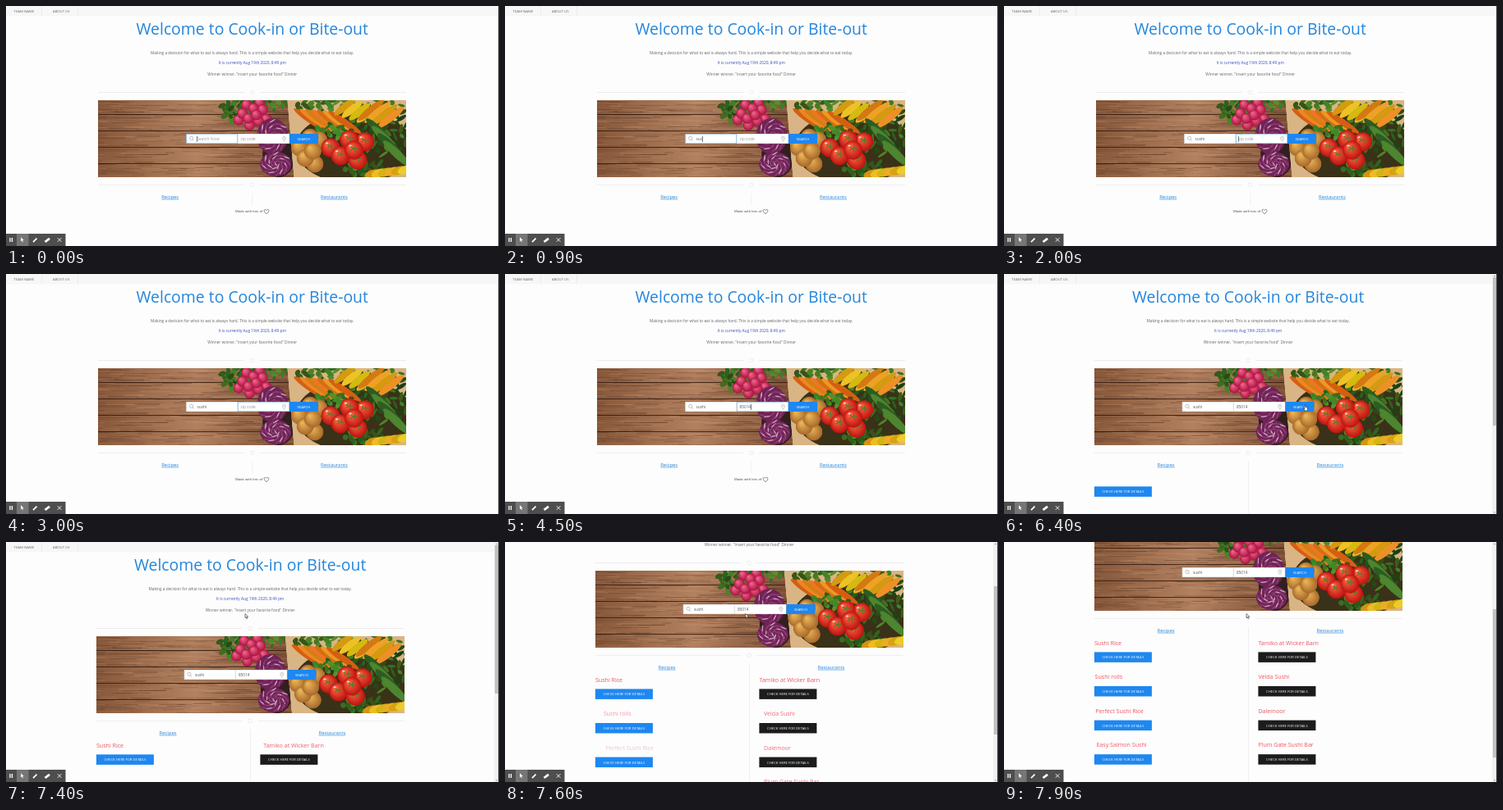
An HTML page with a canvas for the animation above (8000 ms loop, 600x293 px).

```html
<!DOCTYPE html>
<html lang="en">
<head>
<meta charset="utf-8">
<title>Meal finder</title>
<style>
html, body { margin: 0; width: 100%; height: 100%; overflow: hidden; background: #fdfdfd; }
canvas { display: block; }
</style>
</head>
<body>
<canvas id="stage" width="600" height="293"></canvas>
<script>
const ctx = document.getElementById('stage').getContext('2d');
const FONT = '"Open Sans", "Noto Sans", sans-serif';
const BLUE = '#1e87f0', LINK = '#2486dc', GREY = '#666', LINE = '#e8e8e8';
const LOOP = 8000, STEP = 100, TAU = Math.PI * 2;

const clamp = v => Math.max(0, Math.min(1, v));
const span = (t, a, b) => clamp((t - a) / (b - a));
const easeOut = p => 1 - (1 - p) ** 2;
const easeInOut = p => p * p * (3 - 2 * p);
const mix = (a, b, p) => a + (b - a) * p;

function text(str, x, y, size, color, align = 'left') {
  ctx.font = `${size}px ${FONT}`;
  ctx.textAlign = align;
  ctx.fillStyle = color;
  ctx.fillText(str, x, y);
  return ctx.measureText(str).width;
}

function rect(x, y, w, h, color) {
  ctx.fillStyle = color;
  ctx.fillRect(x, y, w, h);
}

function ring(x, y, r, color, width) {
  ctx.beginPath();
  ctx.arc(x, y, r, 0, TAU);
  ctx.strokeStyle = color;
  ctx.lineWidth = width;
  ctx.stroke();
}

function stroke(x1, y1, x2, y2, color, width) {
  ctx.beginPath();
  ctx.moveTo(x1, y1);
  ctx.lineTo(x2, y2);
  ctx.strokeStyle = color;
  ctx.lineWidth = width;
  ctx.stroke();
}

function randomizer(seed) {
  return () => (seed = (seed * 16807) % 2147483647) / 2147483647;
}

// Food banner, 375 x 94, painted once at double size
function paintBanner() {
  const cv = document.createElement('canvas');
  cv.width = 750;
  cv.height = 188;
  const c = cv.getContext('2d');
  const rnd = randomizer(77);
  c.scale(2, 2);

  const blob = (color, x, y, rx, ry = rx, turn = 0) => {
    c.beginPath();
    c.ellipse(x, y, rx, ry, turn, 0, TAU);
    c.fillStyle = color;
    c.fill();
  };
  const ball = (x, y, r, light, dark) => {
    const g = c.createRadialGradient(x - r * .35, y - r * .4, r * .1, x, y, r);
    g.addColorStop(0, light);
    g.addColorStop(1, dark);
    blob(g, x, y, r);
  };
  // Sunflower spread of n items over an ellipse
  const spread = (n, x, y, w, h, draw) => {
    for (let i = n - 1; i >= 0; i--) {
      const r = Math.sqrt((i + .5) / n), a = i * 2.4;
      draw(x + w * r * Math.cos(a), y + h * r * Math.sin(a), i);
    }
  };
  const leaves = (n, x, y, w, h, light) => spread(n, x, y, w, h, (lx, ly) =>
    blob(`hsl(${88 + rnd() * 25} 55% ${light + rnd() * 18}%)`, lx, ly, 3 + rnd() * 4, 1.5 + rnd() * 2, rnd() * 3));
  const fan = (n, x, y, dx, dy, rx, ry, turn, hue) => {
    for (let i = 0; i < n; i++)
      blob(`hsl(${hue + i % 3 * 5} 85% ${45 + i % 2 * 9}%)`, x + i * dx, y + i * dy, rx, ry, turn);
  };
  const cabbage = (x, y, rx, ry) => {
    blob('#6f2455', x, y, rx, ry);
    for (let i = 0; i < 40; i++) {
      const a = i * 2.4, r = Math.sqrt(i / 40);
      blob(i % 3 ? '#8e3c74' : '#c9a0c0', x + Math.cos(a) * rx * r * .9, y + Math.sin(a) * ry * r * .9, 4, .8, a + 1);
    }
  };

  const wood = c.createLinearGradient(0, 0, 240, 0);
  wood.addColorStop(0, '#87583b');
  wood.addColorStop(.5, '#b28160');
  wood.addColorStop(1, '#7d5036');
  c.fillStyle = wood;
  c.fillRect(0, 0, 375, 94);
  for (let i = 0; i < 330; i++) {
    c.fillStyle = rnd() < .55 ? 'rgba(65,32,16,.3)' : 'rgba(230,185,145,.2)';
    c.fillRect(rnd() * 240 - 20, rnd() * 94, 10 + rnd() * 45, .4 + rnd() * .6);
  }
  c.fillStyle = 'rgba(40,20,10,.8)';
  for (let y = 17; y < 94; y += 20) c.fillRect(0, y, 240, 1);

  // Beside the crate
  leaves(30, 170, 11, 22, 15, 18);
  leaves(14, 208, 5, 22, 8, 20);
  spread(11, 188, 18, 20, 17, (x, y) => ball(x, y, 6.5, '#f0648c', '#ac1240'));
  blob('#32201f', 220, 66, 20, 28);
  cabbage(212, 44, 19, 22);
  cabbage(216, 78, 19, 15);

  // Crate and contents
  c.fillStyle = '#d9b485';
  c.beginPath();
  c.moveTo(230, 0);
  c.lineTo(375, 0);
  c.lineTo(375, 94);
  c.lineTo(238, 94);
  c.fill();
  blob('#3a3119', 312, 58, 72, 44);
  leaves(24, 275, 5, 38, 9, 20);
  leaves(60, 346, 32, 38, 36, 16);
  fan(7, 258, 24, 7, .5, 24, 4, .6, 24);
  fan(4, 300, 8, 9, 3, 4.5, 16, .9, 42);
  fan(4, 332, 12, 8, 3, 4.5, 20, .9, 32);
  for (let i = 0; i < 4; i++)
    blob(i % 2 ? '#4d8530' : '#2c5c22', 342 + i * 7, 38 + i * 9, 5, 22, -.8);
  leaves(18, 286, 38, 26, 8, 20);
  spread(6, 257, 62, 14, 26, (x, y) => ball(x, y, 10.5, '#e9b458', '#a8692a'));
  leaves(20, 325, 84, 26, 10, 18);
  fan(6, 334, 90, 8, -1, 10, 5, -.3, 40);
  spread(6, 304, 61, 25, 20, (x, y) => {
    ball(x, y, 11.5, '#ff6645', '#bc130f');
    for (let k = 0; k < 5; k++)
      blob('#4f7c28', x + Math.cos(k * 1.26) * 3, y - 2 + Math.sin(k * 1.26) * 2, 2.5, .6, k * 1.26);
    blob('rgba(255,240,230,.8)', x - 4.5, y - 5.5, 1.6, 1);
  });
  return cv;
}
const banner = paintBanner();

function divider(y) {
  rect(112, y, 178, .8, LINE);
  rect(309, y, 178, .8, LINE);
  ring(299.8, y + .4, 2.3, LINE, .8);
}

function link(str, x) {
  const w = text(str, x, 234.8, 5.9, LINK, 'center');
  rect(x - w / 2, 235.7, w, .6, LINK);
}

function button(x, y, color) {
  rect(x, y, 70, 12.5, color);
  text('CHECK HERE FOR DETAILS', x + 35, y + 7.9, 4.2, '#fff', 'center');
}

function field(x, w, value, hint, textX, focus, caret) {
  rect(x, 156, w, 12, '#fff');
  ctx.strokeStyle = focus ? '#7fb0d8' : '#ddd';
  ctx.lineWidth = .7;
  ctx.strokeRect(x + .3, 156.3, w - .6, 11.4);
  const len = text(value || hint, textX, 163.9, 4.75, value ? '#555' : '#999');
  if (focus && caret) rect(textX + (value ? len + .2 : -.4), 159, .7, 7, '#444');
}

// Even key strokes from the first to the last time
const typed = (str, first, last, t) =>
  t < first ? '' : str.slice(0, 1 + Math.floor((t - first) / (last - first) * (str.length - 1)));

const blink = (t, since) => (t - since) % 1100 < 550;

function search(t) {
  const inFood = t < 1900, inZip = !inFood && t < 6100;
  const caret = inFood || blink(t, t < 3900 ? 1950 : Math.max(3900, Math.min(t, 4500)));
  field(219.5, 62.5, typed('sushi', 300, 1300, t), 'Search Food', 232.5, inFood, caret);
  field(282, 63, typed('85014', 3900, 4500, t), 'zip code', 285.5, inZip, caret);
  ring(225.6, 161.4, 2.1, '#999', .6);
  stroke(227.2, 163, 228.8, 164.7, '#999', .6);
  ctx.beginPath();
  ctx.arc(338.5, 161.2, 2.1, 2.7, .44);
  ctx.lineTo(338.5, 165.2);
  ctx.closePath();
  ctx.strokeStyle = '#aaa';
  ctx.stroke();
  ring(338.5, 161.2, .7, '#aaa', .5);
  rect(345, 156, 35, 12, BLUE);
  text('SEARCH', 362.5, 163.6, 4.3, '#fff', 'center');
}

const columns = [
  { x: 112.5, color: BLUE, shown: 6300, first: 6400, next: 7500, gap: 50,
    names: ['Sushi Rice', 'Sushi rolls', 'Perfect Sushi Rice', 'Easy Salmon Sushi'] },
  { x: 312, color: '#1c1c1c', shown: 7000, first: 7150, next: 7400, gap: 0,
    names: ['Tamiko at Wicker Barn', 'Velda Sushi', 'Dalemoor', 'Plum Gate Sushi Bar'] }
];

function results(t) {
  for (const { x, color, shown, first, next, gap, names } of columns) {
    if (t < shown) continue;
    names.forEach((name, i) => {
      const y = 259.4 + i * 41.6;
      const start = i ? next + gap * (i - 1) : first;
      const p = easeOut(span(t, start, start + 500));
      button(x, y, color);
      ctx.globalAlpha = easeOut(p);
      text(name, x + (1 - p) * 15.6, y - 8.8, 7.1, '#ee5564');
      ctx.globalAlpha = 1;
    });
  }
}

function footer() {
  text('Made with lots of', 279, 252.2, 4.15, '#444');
  ctx.beginPath();
  ctx.moveTo(317, 253.8);
  ctx.bezierCurveTo(311.8, 250, 315, 246.6, 317, 249.4);
  ctx.bezierCurveTo(319, 246.6, 322.2, 250, 317, 253.8);
  ctx.strokeStyle = '#444';
  ctx.lineWidth = .6;
  ctx.stroke();
}

function page(t, found) {
  const line = (str, y, color = GREY) => text(str, 299.7, y, 4.75, color, 'center');
  text('Welcome to Cook-in or Bite-out', 299.7, 34.6, 19.4, LINK, 'center');
  line('Making a decision for what to eat is always hard. This is a simple website that help you decide what to eat today.', 58.8);
  line('It is currently Aug 19th 2020, 8:49 pm', 71.3, '#3a4cc0');
  line('Winner winner, "insert your favorite food" Dinner', 85.2);
  divider(105.1);
  ctx.drawImage(banner, 112.3, 115, 375, 94);
  search(t);
  divider(217.8);
  link('Recipes', 199.7);
  link('Restaurants', 399.5);
  rect(299.6, 229, .6, found ? 190 : 14, LINE);
  if (found) results(t);
  else footer();
}

function tabs() {
  rect(0, 0, 600, 12.4, '#f7f7f8');
  for (const x of [43.4, 87]) rect(x, 0, .6, 12, '#e4e4e6');
  text('TEAM NAME', 9.6, 7.6, 4.3, GREY);
  text('ABOUT US', 57, 7.6, 4.2, GREY);
}

function scrollbar(scroll) {
  rect(594, 0, 6, 293, '#f1f1f1');
  rect(595, 4 + scroll * .625, 4, 181, '#c1c1c1');
  for (const y of [2, 290.5]) rect(596.3, y, 1.5, 1, '#777');
}

// Filled outline from "x,y x,y ..." points
function shape(d, x, y, fill, edge) {
  const p = new Path2D(`M${d}Z`);
  ctx.save();
  ctx.translate(x, y);
  ctx.fillStyle = fill;
  ctx.fill(p);
  if (edge) {
    ctx.strokeStyle = edge;
    ctx.lineWidth = .6;
    ctx.stroke(p);
  }
  ctx.restore();
}
const ARROW = '0,0 0,5 1.2,4 2,6 2.9,5.6 2.1,3.7 3.7,3.6';
const HAND = '0,0 1,0 1,2.4 3.6,3 3.2,7 .2,7 -1.6,4 0,4.4';

function toolbar() {
  rect(0, 278, 72.5, 15, '#4e4e4e');
  rect(13, 278, 14.5, 15, '#767676');
  rect(4.3, 283, 1.3, 5, '#fff');
  rect(6.8, 283, 1.3, 5, '#fff');
  shape(ARROW, 18, 282.3, '#fff');
  stroke(33, 288.2, 37.5, 283.7, '#fff', 1.7);
  stroke(47.5, 288, 53, 283.8, '#fff', 2.8);
  stroke(62.8, 283.2, 67.4, 287.8, '#fff', .9);
  stroke(67.4, 283.2, 62.8, 287.8, '#fff', .9);
}

// Text beam across the fields, hand on the button, then arrow up the page
function pointer(t) {
  if (t < 5300) return;
  const into = easeInOut(span(t, 5300, 6000));
  const away = easeInOut(span(t, 6500, 7100));
  const x = mix(mix(250, 366, into), 291, away) + 4 * span(t, 7400, 7900);
  const y = mix(160, 87.5, away);
  if (away > .1) shape(ARROW, x, y, '#fff', '#222');
  else if (x > 345) shape(HAND, x, y, '#fff', '#222');
  else {
    rect(x, y - 1, .7, 6.5, '#444');
    rect(x - .8, y - 1, 2.3, .5, '#444');
    rect(x - .8, y + 5, 2.3, .5, '#444');
  }
}

function draw(now) {
  const t = Math.floor(now % LOOP / STEP) * STEP;
  const found = t >= 6200;
  const scroll = 125 * easeOut(span(t, 7400, 7900));
  rect(0, 0, 600, 293, '#fdfdfd');
  ctx.save();
  ctx.translate(0, -scroll);
  tabs();
  ctx.translate(found ? -2.6 : 0, 0);
  page(t, found);
  ctx.restore();
  if (found) scrollbar(scroll);
  rect(599, 0, 1, 293, '#555');
  toolbar();
  pointer(t);
}

const begin = performance.now();
function frame() {
  draw(performance.now() - begin);
  requestAnimationFrame(frame);
}
frame();
</script>
</body>
</html>
```
